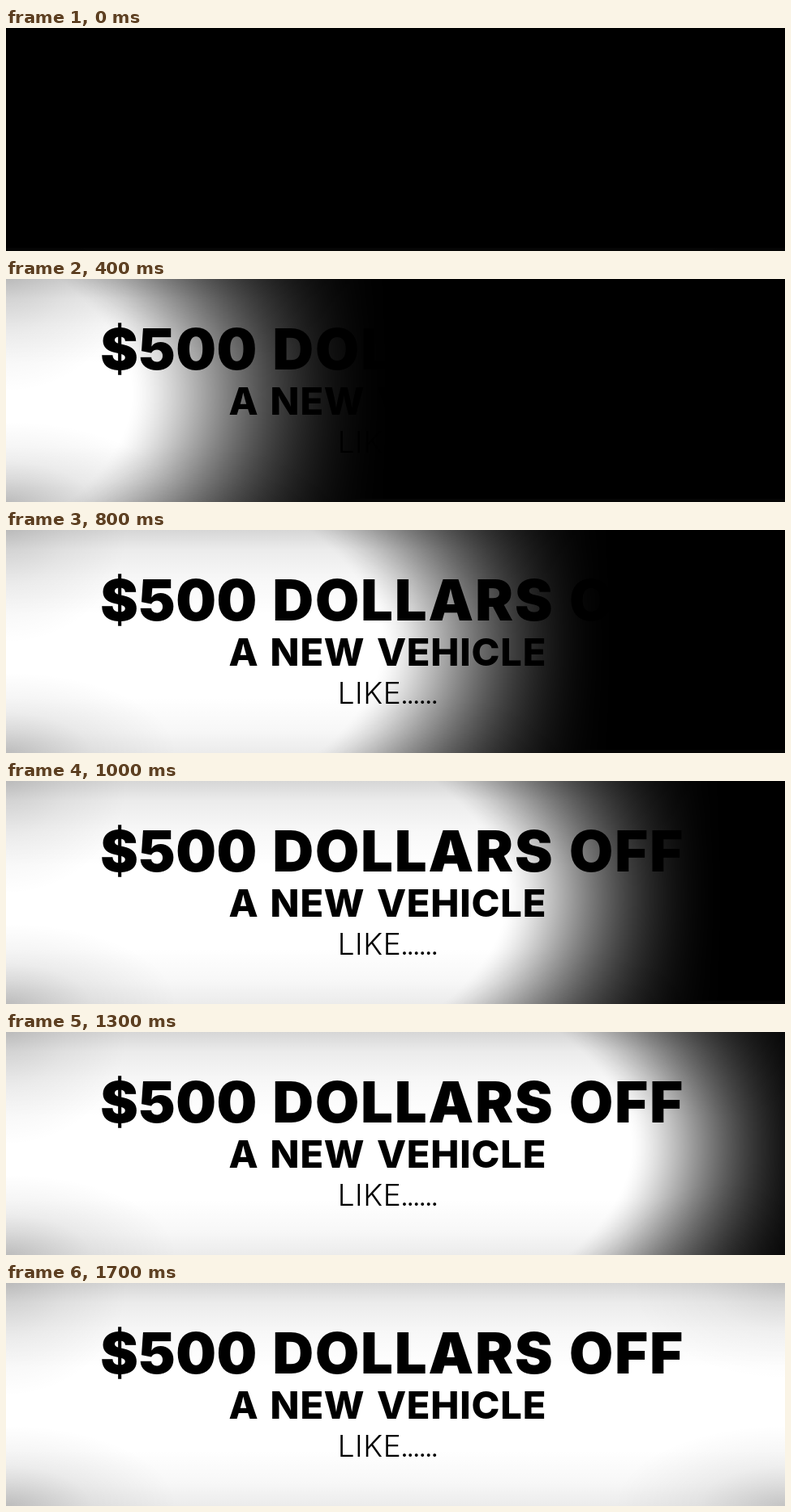
These frames come from a looping animation (960 px wide and 276 px high, 6700 ms). An HTML page with a canvas:

```html
<!DOCTYPE html>
<html lang="en">
<head>
<meta charset="utf-8">
<title>$500 dollars off</title>
<style>
  html, body { margin: 0; width: 100%; height: 100%; overflow: hidden; background: #000; }
  #stage {
    position: relative; width: 960px; height: 276px; overflow: hidden;
    background:
      radial-gradient(ellipse 150px 140px at 0 0, rgba(0,0,0,.13), rgba(0,0,0,.05) 50%, transparent),
      radial-gradient(ellipse 190px 120px at 100% 0, rgba(0,0,0,.10), rgba(0,0,0,.03) 50%, transparent),
      radial-gradient(ellipse 210px 100px at 0 100%, rgba(0,0,0,.20), rgba(0,0,0,.06) 50%, transparent),
      radial-gradient(ellipse 210px 100px at 100% 100%, rgba(0,0,0,.17), rgba(0,0,0,.05) 50%, transparent),
      linear-gradient(rgba(0,0,0,.16), rgba(0,0,0,.08) 24px, rgba(0,0,0,.03) 60px, transparent 105px),
      linear-gradient(to top, rgba(0,0,0,.08), rgba(0,0,0,.03) 28px, transparent 70px),
      #fff;
  }
  svg, canvas { position: absolute; left: 0; top: 0; display: block; }
  text { font-family: Inter, "Open Sans", sans-serif; text-anchor: middle; fill: #000; }
  .big { font-size: 70px; font-weight: 900; letter-spacing: 2px; }
  .price { letter-spacing: .5px; }
  .mid { font-size: 47px; font-weight: 800; letter-spacing: .8px; }
  .small { font-size: 37px; font-weight: 300; letter-spacing: .5px; }
  .dots { letter-spacing: -3px; }
</style>
</head>
<body>
<div id="stage">
  <svg width="960" height="276" viewBox="0 0 960 276">
    <g class="big">
      <text class="price" x="213" y="112">$500</text>
      <text x="502" y="112">DOLLARS</text>
      <text x="765" y="112">OFF</text>
    </g>
    <g class="mid">
      <text x="293" y="168">A</text>
      <text x="384" y="168">NEW</text>
      <text x="561.5" y="168">VEHICLE</text>
    </g>
    <g class="small">
      <text x="448" y="214.5">LIKE</text>
      <text class="dots" x="508" y="214.5">......</text>
    </g>
  </svg>
  <canvas id="shade" width="960" height="276"></canvas>
</div>
<script>
  const W = 960, H = 276, LOOP = 6700, LAST = 16;
  const ctx = document.getElementById('shade').getContext('2d');
  const img = ctx.createImageData(W, H);
  let shown = -1;

  // The light advances every 100 ms, with one double pause at 1000 ms.
  function stepAt(t) {
    const n = Math.floor(t / 100);
    return Math.min(n > 10 ? n - 1 : n, LAST);
  }

  // Darkness from 0 at the lit rim to 1 at the black end.
  function falloff(v) {
    if (v <= 0) return 0;
    if (v >= 1) return 1;
    return Math.pow(1 - Math.pow(1 - v, 2.2), 1.5);
  }

  function paint(step) {
    const rim = -155 + 77 * step;
    const soft = Math.min(150 + 45 * step, 368 - 9 * step);
    for (let y = 0; y < H; y++) {
      const d = (y - 142) / 142;
      const reach = 90 * d * d;
      const max = y >= 272 ? 0.975 : 1;
      for (let x = 0; x < W; x++) {
        const dark = falloff((x - rim + reach) / (soft + reach));
        img.data[(y * W + x) * 4 + 3] = 255 * Math.min(dark, max);
      }
    }
    ctx.putImageData(img, 0, 0);
  }

  const start = performance.now();
  function tick() {
    const step = stepAt((performance.now() - start) % LOOP);
    if (step !== shown) paint(shown = step);
    requestAnimationFrame(tick);
  }
  tick();
</script>
</body>
</html>
```
